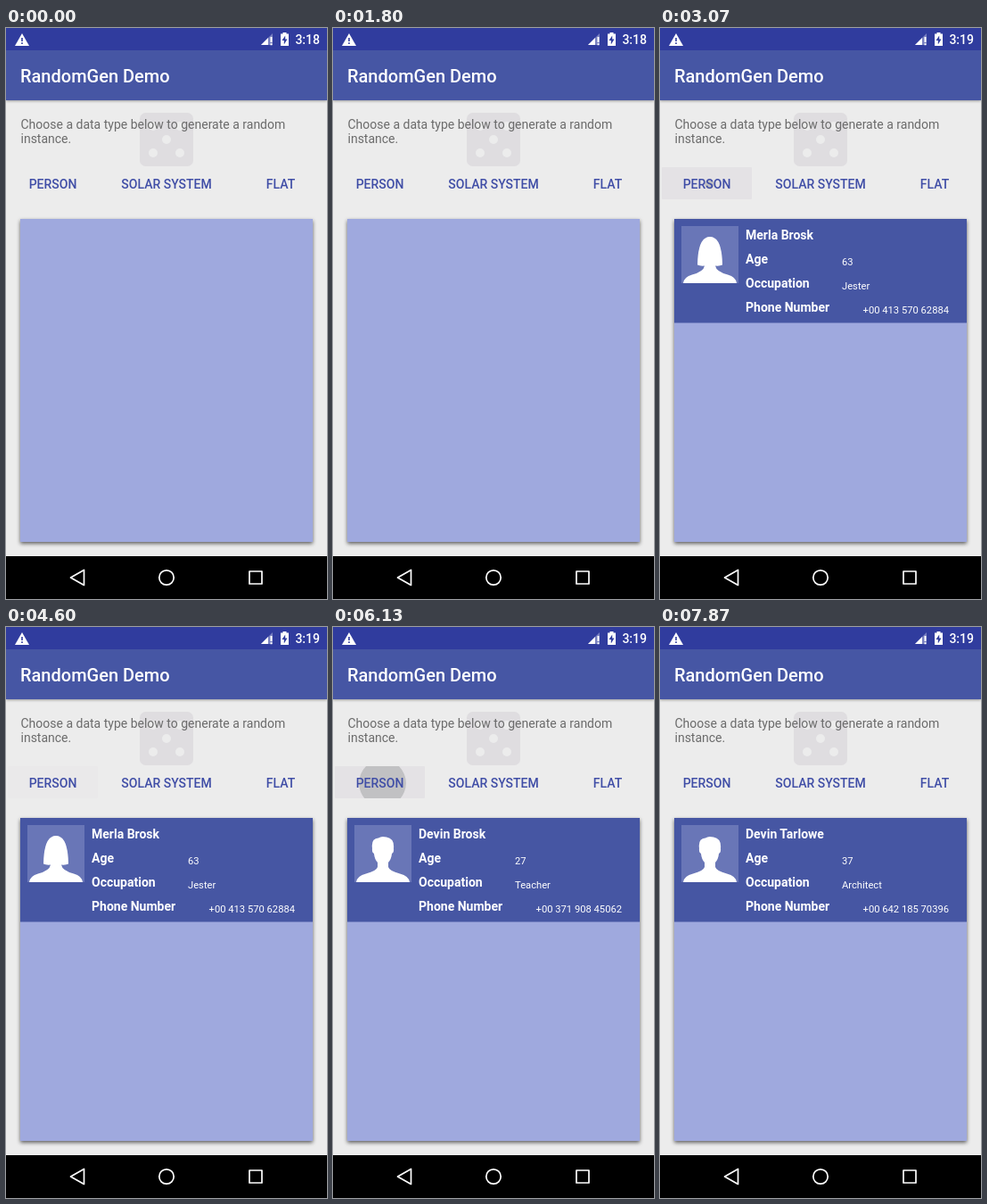
An HTML page that plays this animation: 360x640 px, repeating every 8000 ms.

```html
<!DOCTYPE html>
<html lang="en">
<head>
<meta charset="utf-8">
<title>RandomGen Demo</title>
<style>
  html, body { margin: 0; width: 100%; height: 100%; overflow: hidden; background: #ececec; }
  svg { display: block; width: 360px; height: 640px; font-family: Roboto, sans-serif; }
  .title { font: 500 20px Roboto, sans-serif; fill: #fff; }
  .intro { font-size: 14px; fill: #6b6b6b; }
  .button { font-size: 14px; font-weight: 500; fill: #3f4da6; text-anchor: middle; }
  .label { font-size: 14px; font-weight: 700; fill: #fff; }
  .value { font-size: 11.2px; fill: #fff; }
  .bar { filter: drop-shadow(0 1px 1.5px rgba(0, 0, 0, .35)); }
  .sheet { filter: drop-shadow(0 2px 2px rgba(0, 0, 0, .6)); }
</style>
</head>
<body>
<svg viewBox="0 0 360 640">
  <defs><clipPath id="clip"><rect x="2" y="156" width="101" height="36" rx="1"/></clipPath></defs>
  <rect width="360" height="640" fill="#ececec"/>
  <rect class="bar" width="360" height="81" fill="#4656a4"/>
  <rect width="360" height="25" fill="#303c9e"/>

  <!-- status bar -->
  <path d="M18 6L26 20H10Z" fill="#fff"/>
  <path d="M17.2 11h1.6v4h-1.6zM17.2 16.3h1.6v1.6h-1.6z" fill="#303c9e"/>
  <path d="M299 6V19H286Z" fill="#fff" opacity=".35"/>
  <path d="M294 11V19H286Z" fill="#fff"/>
  <path d="M296.5 10h2v6h-2zM296.5 17.2h2v2h-2z" fill="#fff"/>
  <path d="M310.5 5h4v1.5h2.5v13.5h-9V6.500h2.5z" fill="#fff"/>
  <path d="M313.200 8.500v4h2.300l-3.700 6v-4.500h-2.300z" fill="#303c9e"/>
  <text id="clock" class="button" style="fill:#fff;text-anchor:end" x="352" y="18"></text>
  <text class="title" x="16" y="61">RandomGen Demo</text>

  <!-- die and introduction -->
  <rect x="150" y="95" width="60" height="60" rx="6.600" fill="#dfdde0"/>
  <g fill="#ececec">
    <circle cx="165" cy="110" r="5"/><circle cx="195" cy="110" r="5"/><circle cx="180" cy="125" r="5"/>
    <circle cx="165" cy="140" r="5"/><circle cx="195" cy="140" r="5"/>
  </g>
  <text class="intro" x="16.500" y="113">Choose a data type below to generate a random</text>
  <text class="intro" x="16.500" y="129">instance.</text>

  <g clip-path="url(#clip)">
    <rect id="pressed" x="2" y="156" width="101" height="36" fill="#e4e2e5"/>
    <circle id="ripple" cx="55.500" cy="175" fill="#c1c1c3"/>
  </g>
  <text class="button" x="52.500" y="180">PERSON</text>
  <text class="button" x="180" y="180">SOLAR SYSTEM</text>
  <text class="button" x="308" y="180">FLAT</text>

  <rect class="sheet" x="16" y="214" width="328" height="362" fill="#9fa9de"/>
  <g id="card">
    <rect x="16" y="214" width="328" height="116.500" fill="#4656a3"/>
    <rect x="24" y="222" width="64" height="64" fill="#6976b7"/>
    <path id="avatar" fill="#fff"/>
    <text id="name" class="label" x="96" y="237"></text>
    <text class="label" x="96" y="264">Age</text>
    <text class="label" x="96" y="291">Occupation</text>
    <text class="label" x="96" y="318">Phone Number</text>
    <text id="age" class="value" x="204" y="266"></text>
    <text id="job" class="value" x="204" y="293"></text>
    <text id="phone" class="value" x="324" y="320" text-anchor="end"></text>
  </g>

  <!-- navigation bar -->
  <rect y="592" width="360" height="48"/>
  <g fill="none" stroke="#fff" stroke-width="1.700" stroke-linejoin="round">
    <path d="M87.500 607.500V624.500L72.500 616Z"/>
    <circle cx="180" cy="616" r="8.200"/>
    <rect x="273" y="609" width="14" height="14"/>
  </g>
</svg>
<script>
const LOOP = 8000, CLOCK_TICK = 2870, GROW = 214, MAX_RADIUS = 54;
const $ = id => document.getElementById(id);
const clamp = v => Math.max(0, Math.min(1, v));

const woman = 'M26 286Q27 279 36 276.500Q49 273 50 266.500Q45 267 42 265.500Q42.500 234 56 234Q69.500 234 70 265.500Q67 267 62 266.500Q63 273 76 276.500Q85 279 86 286Z';
const man = 'M26 286Q27 279 37 276.500Q49 273 50 269V264Q46.500 260 46 254Q43.500 253 44 248Q42.500 237 51 236.500Q54 234 60 235.500Q69 237 68 248Q68.500 253 66 254Q65.500 260 62 264V269Q63 273 75 276.500Q85 279 86 286Z';

// Each press shows the next person once its ripple begins.
const presses = [
  { down: 2930, ripple: 3060, end: 3400, avatar: woman, name: 'Merla Brosk', age: 63, job: 'Jester', phone: '+00 413 570 62884' },
  { down: 4600, ripple: 4670, end: 5070, avatar: man, name: 'Devin Quillam', age: 45, job: 'Plumber', phone: '+00 826 534 91107' },
  { down: 6000, ripple: 6070, end: 6470, avatar: man, name: 'Devin Brosk', age: 27, job: 'Teacher', phone: '+00 371 908 45062' },
  { down: 7400, ripple: 7470, end: 7870, avatar: man, name: 'Devin Tarlowe', age: 37, job: 'Architect', phone: '+00 642 185 70396' }
];
let shown;

function showPerson(person) {
  if (person === shown) return;
  shown = person;
  $('card').style.display = person ? '' : 'none';
  if (!person) return;
  $('avatar').setAttribute('d', person.avatar);
  for (const key of ['name', 'age', 'job', 'phone']) $(key).textContent = person[key];
}

function drawPress(t) {
  const press = presses.find(p => t >= p.down && t < p.end);
  let background = 0, radius = 0, ink = 0;
  if (press) {
    const left = press.end - t;
    const grown = clamp((t - press.ripple) / GROW);
    background = clamp((t - press.down + 30) / 100) * clamp(left / 200);
    radius = MAX_RADIUS * (1 - (1 - grown) ** 2);
    ink = clamp(left / 300);
  }
  $('pressed').setAttribute('opacity', background);
  $('ripple').setAttribute('r', radius);
  $('ripple').setAttribute('opacity', ink);
}

function draw(now) {
  const t = now % LOOP;
  $('clock').textContent = t < CLOCK_TICK ? '3:18' : '3:19';
  showPerson(presses.filter(p => t >= p.ripple).pop() || null);
  drawPress(t);
}

const start = performance.now();
function tick() {
  draw(performance.now() - start);
  requestAnimationFrame(tick);
}
tick();
</script>
</body>
</html>
```
